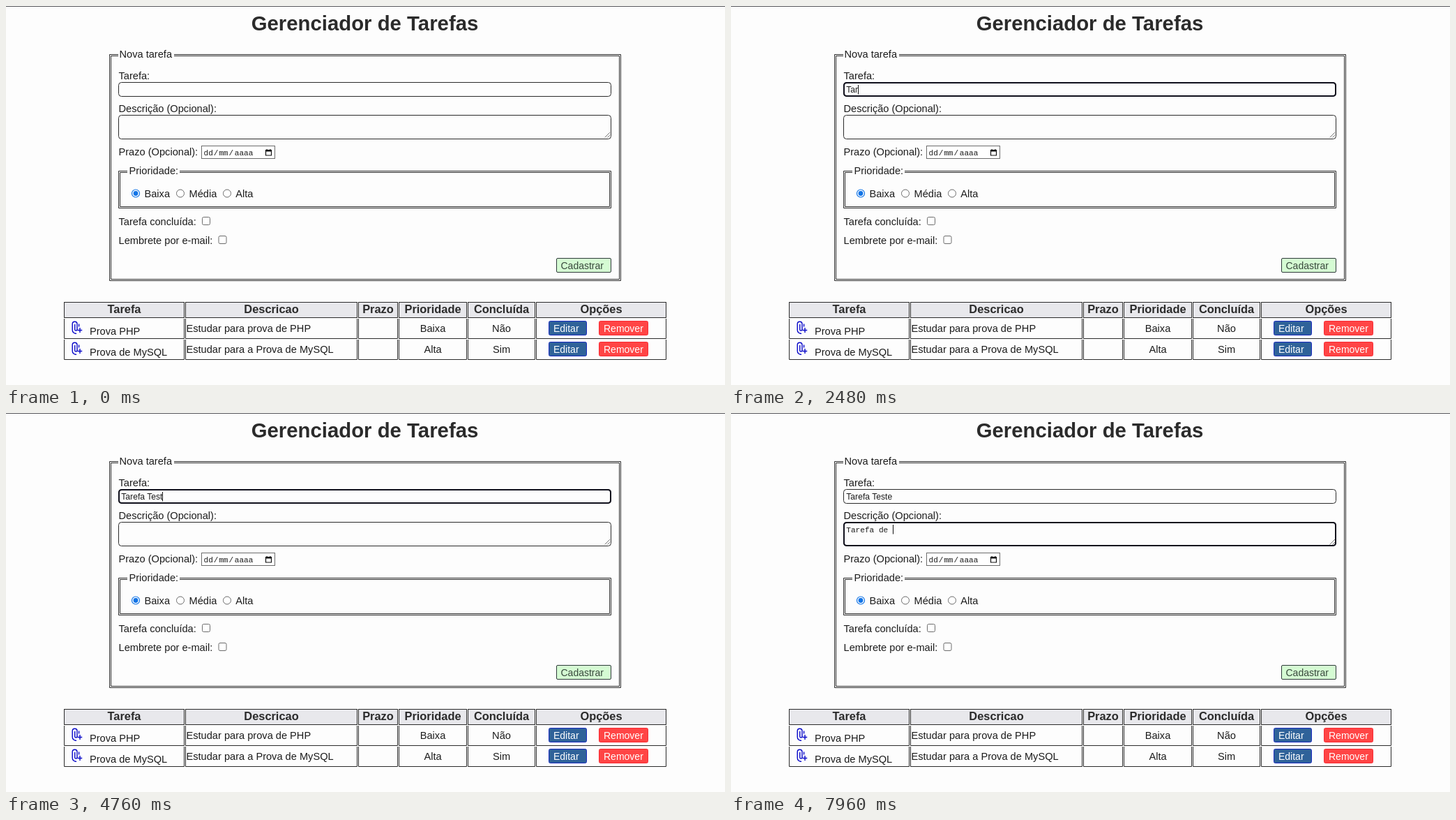
Animation, 1031 px wide and 543 px high, one loop 8000 ms. Source, as an HTML page:

```html
<!DOCTYPE html>
<html lang="pt">
<head>
<meta charset="utf-8">
<title>Gerenciador de Tarefas</title>
<style>
html, body { margin: 0; width: 100%; height: 100%; overflow: hidden; background: #fdfdfd; }
svg { display: block; }
text { font-family: "Liberation Sans", Arial, sans-serif; font-size: 14.62px; fill: #1c1c1c; white-space: pre; }
.title { font-size: 29.35px; font-weight: bold; fill: #2b2b2b; }
.head { font-size: 16.4px; font-weight: bold; fill: #2b2b2b; }
.btn { font-size: 14px; }
.send { fill: #38483c; }
.light { fill: #fff; }
.entry { font-size: 12.13px; }
.mono { font-family: "Liberation Mono", "Courier New", monospace; font-size: 11.1px; }
.mid { text-anchor: middle; }
.line { fill: none; stroke: #2b2b2b; stroke-width: 1; }
.soft { fill: #fff; stroke: #6c6c6c; stroke-width: 1; }
.focus { fill: none; stroke: #10101c; stroke-width: 2; }
.clip { fill: none; stroke: #0808c8; stroke-width: 1.4; }
</style>
</head>
<body>
<svg id="stage" width="1031" height="543" viewBox="0 0 1031 543">
  <rect width="1031" height="543" fill="#fdfdfd"/>
  <rect width="1031" height="1" fill="#55555a"/>
  <text class="title mid" x="514.5" y="35">Gerenciador de Tarefas</text>

  <path class="line" d="M161 69.5H148.5V393.5H881.5V69.5H241M161 71.5H150.5V391.5H879.5V71.5H241"/>
  <text x="162.5" y="74">Nova tarefa</text>

  <text x="161.5" y="105">Tarefa:</text>
  <rect class="line" x="161.5" y="109.5" width="706" height="20" rx="4"/>
  <text x="161.5" y="152">Descrição (Opcional):</text>
  <rect class="line" x="161.5" y="156.5" width="706" height="34" rx="4"/>
  <path d="M858.5 188.5L866 181M862.5 188.5L866 185" stroke="#777" fill="none"/>

  <text x="161.5" y="214">Prazo (Opcional):</text>
  <rect class="soft" x="280.5" y="200.5" width="105" height="18"/>
  <g id="date"></g>
  <path d="M372.5 206.5h8v7.5h-8z" fill="none" stroke="#111" stroke-width="1.2"/>
  <path d="M372 206h9v2.5h-9zM373.5 205h1.2v2h-1.2zM378.3 205h1.2v2h-1.2z" fill="#111"/>

  <path class="line" d="M174 236.5H161.5V289.5H867.5V236.5H249M174 238.5H163.5V287.5H865.5V238.5H249"/>
  <text x="176.5" y="241">Prioridade:</text>
  <circle cx="186" cy="268.5" r="5.5" fill="#fff" stroke="#1274e6" stroke-width="1.2"/>
  <circle cx="186" cy="268.5" r="3.4" fill="#1274e6"/>
  <circle class="soft" cx="250" cy="268.5" r="5.5"/>
  <circle class="soft" cx="317" cy="268.5" r="5.5"/>
  <text x="198.5" y="274">Baixa</text>
  <text x="262.5" y="274">Média</text>
  <text x="329.3" y="274">Alta</text>

  <text x="161.5" y="314">Tarefa concluída:</text>
  <rect class="soft" x="281.5" y="302.5" width="11" height="11" rx="2"/>
  <text x="161.5" y="341">Lembrete por e-mail:</text>
  <rect class="soft" x="305" y="329.5" width="11" height="11" rx="2"/>

  <rect x="789.5" y="361.5" width="78" height="20" rx="1.5" fill="#d5fbd3" stroke="#2f3a3a"/>
  <text class="btn send" x="795.5" y="377">Cadastrar</text>

  <g id="table"></g>

  <rect id="ring" class="focus" x="162" width="705" rx="4"/>
  <text id="task" class="entry" x="165.3" y="124"></text>
  <text id="note" class="mono" x="165.3" y="171"></text>
  <rect id="caret" width="1" height="13.5" fill="#111"/>
</svg>
<script>
const LOOP = 8000;
const $ = id => document.getElementById(id);

// Static table: cells keep a one pixel gap between columns
const cols = [
  [83.5, 255.5, "Tarefa"], [257.5, 503.5, "Descricao"], [505.5, 561.5, "Prazo"],
  [563.5, 660.5, "Prioridade"], [662.5, 758.5, "Concluída"], [760.5, 946.5, "Opções"]
];
const rows = [
  ["Prova PHP", "Estudar para prova de PHP", "Baixa", "Não"],
  ["Prova de MySQL", "Estudar para a Prova de MySQL", "Alta", "Sim"]
];
const label = (x, y, s, cls = "") => `<text class="${cls}" x="${x}" y="${y}">${s}</text>`;
const center = i => (cols[i][0] + cols[i][1]) / 2;

function button(x, y, w, s, fill, edge) {
  return `<rect x="${x + .5}" y="${y + .5}" width="${w - 1}" height="20" rx="2" fill="${fill}" stroke="${edge}"/>` +
    label(x + 7, y + 16, s, "btn light");
}

function clip(y) {
  return `<path class="clip" transform="translate(0 ${y})" d="M104.6 7.5v4M101 21.2a5 5 0 0 1-5.8-5v-8.6a3.4 3.4 0 0 1 6.8 0v7.8` +
    `a1.6 1.6 0 0 1-3.3 0v-7.5M106 13v7M102.6 16.5h6.6"/>`;
}

function tableMarkup() {
  let out = "";
  cols.forEach(([a, b, name], i) => {
    out += `<rect x="${a}" y="424.5" width="${b - a}" height="22" fill="#e8e8ec" stroke="#2b2b2b"/>`;
    out += label(center(i), 440, name, "head mid");
    for (const y of [448, 478]) {
      out += `<path class="line" d="M${a} ${y}V${y + 28.5}H${b}V${y}"/>`;
    }
  });
  rows.forEach(([name, about, level, done], i) => {
    const y = 448 + 30 * i;
    out += clip(y) + label(120, y + 23, name) + label(258.5, y + 19, about);
    out += label(center(3), y + 19, level, "mid") + label(center(4), y + 19, done, "mid");
    out += button(778, y + 3, 55, "Editar", "#2f6299", "#1c2cc0");
    out += button(850, y + 3, 71, "Remover", "#ff4545", "#f92a34");
  });
  return out;
}

$("table").innerHTML = tableMarkup();
$("date").innerHTML = [[283.5, "dd"], [297.8, "/"], [305.2, "mm"], [319.6, "/"], [327.8, "aaaa"]]
  .map(([x, s]) => label(x, 213.5, s, "mono")).join("");

// Each field: time of focus, time of every key
const fields = [
  { el: $("task"), text: "Tarefa Teste", focus: 960, top: 110, height: 19, caretY: 113,
    keys: [2080, 2240, 2440, 2720, 2960, 3240, 3760, 4000, 4240, 4440, 4660, 4900] },
  { el: $("note"), text: "Tarefa de ", focus: 5480, top: 157, height: 33, caretY: 160,
    keys: Array.from({ length: 10 }, (_, i) => 6280 + 170 * i) }
];

function draw(t) {
  let active = null;
  for (const f of fields) {
    f.count = f.keys.filter(k => k <= t).length;
    f.el.textContent = f.text.slice(0, f.count);
    if (t >= f.focus) active = f;
  }
  const ring = $("ring"), caret = $("caret");
  ring.style.display = active ? "" : "none";
  caret.style.display = "none";
  if (!active) return;
  ring.setAttribute("y", active.top);
  ring.setAttribute("height", active.height);
  const last = active.count ? active.keys[active.count - 1] : active.focus;
  if ((t - last) % 1000 >= 500) return;
  const width = active.count ? active.el.getComputedTextLength() : 0;
  caret.setAttribute("x", Math.round(165.3 + width));
  caret.setAttribute("y", active.caretY);
  caret.style.display = "";
}

const start = performance.now();
function tick() {
  draw((performance.now() - start) % LOOP);
  requestAnimationFrame(tick);
}
tick();
</script>
</body>
</html>
```
